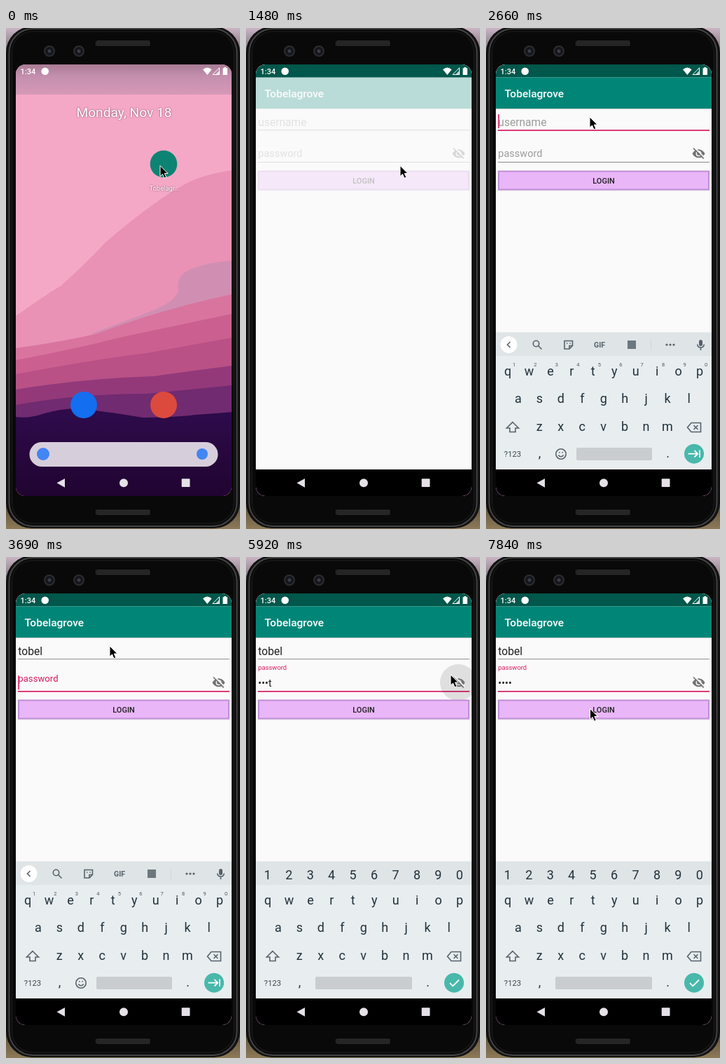
Animation of 334x715 px, one loop 7990 ms. Source, as an HTML page:

```html
<!DOCTYPE html>
<html lang="en">
<head>
<meta charset="utf-8">
<title>Login demo</title>
<style>
html, body { margin: 0; width: 100%; height: 100%; overflow: hidden; background: #000; }
svg { display: block; }
text { font-family: Roboto, sans-serif; white-space: pre; }
.mid { text-anchor: middle; }
.key { font-size: 18px; fill: #20323a; text-anchor: middle; }
.sup { font-size: 7.5px; fill: #4c5a61; text-anchor: middle; }
.med { font-weight: 500; }
.line { fill: none; stroke: #56626a; stroke-width: 1.6; }
.shade { filter: drop-shadow(0 0 1px rgba(60, 20, 50, .7)); }
</style>
</head>
<body>
<svg width="334" height="715" viewBox="0 0 334 715">
  <defs>
    <clipPath id="screen"><rect x="14" y="52" width="308" height="616" rx="14"/></clipPath>
    <clipPath id="body"><rect x="14" y="52" width="308" height="578"/></clipPath>
    <clipPath id="winClip"><rect id="winShape"/></clipPath>
    <linearGradient id="scrimFill" x2="0" y2="1">
      <stop offset="0" stop-color="#a97c95"/><stop offset=".4" stop-color="#c48fae"/><stop offset="1" stop-color="#d699b7"/>
    </linearGradient>
    <linearGradient id="hill" x2="0" y2="1">
      <stop offset="0" stop-color="#2f0b4c"/><stop offset="1" stop-color="#200430"/>
    </linearGradient>
    <linearGradient id="backdrop" x2="0" y2="1">
      <stop offset="0" stop-color="#c9b4c4"/><stop offset=".1" stop-color="#2a2826"/>
      <stop offset=".9" stop-color="#2a2620"/><stop offset="1" stop-color="#8d7a58"/>
    </linearGradient>
    <pattern id="mesh" width="2" height="2" patternUnits="userSpaceOnUse">
      <rect width="2" height="2" fill="#191919"/><rect width="1" height="1" fill="#4a4a4a"/>
    </pattern>
  </defs>

  <!-- phone -->
  <rect width="334" height="715" fill="url(#backdrop)"/>
  <rect x="0" y="-2" width="334" height="716" rx="37" fill="#111"/>
  <rect x="4.5" y="1" width="325" height="710" rx="34" fill="#0b0b0b" stroke="#444" stroke-width="2"/>
  <rect x="8.5" y="5" width="317" height="702" rx="30" fill="#090909" stroke="#1f1f1f"/>
  <rect x="128" y="18" width="78" height="8" rx="3" fill="url(#mesh)"/>
  <rect x="128" y="687" width="78" height="8" rx="3" fill="url(#mesh)"/>
  <g fill="#15161b" stroke="#2d2d30" stroke-width="2">
    <circle cx="62" cy="33" r="7"/><circle cx="104" cy="33" r="7"/>
  </g>
  <g fill="#3a3c48"><circle cx="62" cy="33" r="2.5"/><circle cx="104" cy="33" r="2.5"/></g>

  <g clip-path="url(#screen)">
    <!-- wallpaper -->
    <rect x="14" y="52" width="308" height="616" fill="#f5a8c6"/>
    <path fill="#e992b6" d="M322 203Q275 210 250 226Q210 248 143 305Q110 340 78 368Q50 385 14 411V668H322Z"/>
    <path fill="#d08fb2" d="M322 332Q282 335 258 347Q243 355 246 374Q243 390 205 405L120 437L322 410Z"/>
    <path fill="#d9749f" d="M14 457Q90 446 130 436Q220 402 322 380V668H14Z"/>
    <path fill="#cb6090" d="M14 474Q90 460 170 440L322 408V668H14Z"/>
    <path fill="#b95186" d="M14 494Q120 474 200 464L322 442V668H14Z"/>
    <path fill="#93397a" d="M14 516Q110 500 210 497L322 482V668H14Z"/>
    <path fill="#712b70" d="M14 538Q100 522 200 522L322 510V668H14Z"/>
    <rect id="glow" x="14" y="52" width="308" height="496" fill="#fff"/>
    <path fill="url(#hill)" d="M14 555Q32 558 55 550Q80 543 100 543Q150 548 195 556Q240 556 270 552Q300 550 322 548V668H14Z"/>
    <rect id="scrim" x="14" y="52" width="308" height="43" fill="url(#scrimFill)"/>

    <g id="home">
      <text class="mid shade" x="168.5" y="126.5" font-size="19.2" fill="#fff">Monday, Nov 18</text>
      <circle cx="225" cy="194" r="19.3" fill="#0d8473"/>
      <text class="mid shade" x="225.5" y="231.5" font-size="9.4" fill="#fff">Tobelagr…</text>
      <circle cx="111" cy="538" r="19" fill="#136ef0"/>
      <circle cx="225" cy="538" r="19" fill="#dc4a3d"/>
      <rect x="33.5" y="591" width="269" height="35" rx="17.5" fill="#d7cedb"/>
      <circle cx="53" cy="608" r="9" fill="#4285f4"/>
      <circle cx="280" cy="608" r="8" fill="#4285f4"/>
    </g>

    <!-- app window -->
    <g id="win" clip-path="url(#winClip)">
      <rect x="14" y="52" width="308" height="616" fill="#fafafa"/>
      <rect id="winTop" x="14" width="308" fill="#00574b"/>
      <rect id="winBase" x="14" width="308" height="40" fill="#000"/>
    </g>

    <g id="app">
      <rect x="14" y="115" width="308" height="1.2" fill="#000" opacity=".15"/>
      <rect x="14" y="70.5" width="308" height="44.5" fill="#008577"/>
      <text class="med" x="26.5" y="99" font-size="15.5" fill="#fff">Tobelagrove</text>
      <text id="user" x="17.3" y="139.5" font-size="15.6"></text>
      <rect id="userLine" x="17" width="302"/>
      <rect id="passLine" x="17" width="302"/>
      <text id="hint" x="17.3">password</text>
      <text id="pass" x="17.3" y="184.5" font-size="14.5" fill="#212121"></text>
      <rect id="caret" width="1.6" height="20" fill="#d81b60"/>
      <circle id="ripple" cx="303" cy="179" r="26" fill="#000"/>
      <g transform="translate(303.5 179.3)">
        <path fill="#737373" fill-rule="evenodd" d="M-9 0C-5-8 5-8 9 0C5 8-5 8-9 0ZM-4 0A4 4 0 1 0 4 0A4 4 0 1 0-4 0Z"/>
        <circle r="2.5" fill="#737373"/>
        <g id="slash" fill="none" stroke-width="1.7">
          <path d="M-5.8-8.5L8.6 5.9" stroke="#fafafa"/><path d="M-7.5-7.8L7.2 7" stroke="#737373"/>
        </g>
      </g>
      <rect x="16.5" y="231" width="303" height="1.5" fill="#000" opacity=".1"/>
      <rect x="18" y="204.5" width="300" height="26" fill="#e9b6f8" stroke="#c18ed6" stroke-width="2"/>
      <text class="mid med" x="168" y="221.5" font-size="11" fill="#1f1f1f">LOGIN</text>
    </g>

    <!-- keyboard -->
    <g clip-path="url(#body)">
      <g id="board">
        <rect x="14" y="434.5" width="308" height="196" fill="#e8edf0"/>
        <rect x="14" y="434.5" width="308" height="33.5" fill="#dfe4e7"/>
        <g id="keys"></g>
        <g id="tools">
          <circle cx="32.5" cy="452" r="12" fill="#fff"/>
          <path class="line" d="M34.5 448L30.5 452L34.5 456"/>
          <circle class="line" cx="71.5" cy="450.5" r="4.2"/><path class="line" d="M74.5 453.5L79.5 458.5"/>
          <path class="line" d="M112 446.5H123.5V453.5L119 458H112ZM119 458V453.5H123.5M115 450H116.4M119.4 450H120.8"/>
          <text class="mid" x="162" y="456" font-size="10.5" font-weight="700" fill="#56626a">GIF</text>
          <rect x="202" y="446" width="12" height="12" fill="#6d787e"/>
          <path d="M235.5 445V460" stroke="#cfd5d9"/>
          <g fill="#56626a"><circle cx="258" cy="452" r="1.6"/><circle cx="263" cy="452" r="1.6"/><circle cx="268" cy="452" r="1.6"/>
            <rect x="304" y="445" width="5" height="9" rx="2.5"/></g>
          <path class="line" d="M301.8 451.5Q302 456 306.5 456Q311 456 311.2 451.5M306.5 456V460"/>
          <circle class="line" cx="107" cy="608" r="7.2"/>
          <path class="line" d="M103.3 609.5Q107 614 110.7 609.5M104 605.7H105.6M108.4 605.7H110"/>
        </g>
        <g id="digits"></g>
        <path class="line" d="M38 562.5L46.5 571H42V576.5H34V571H29.5Z"/>
        <path class="line" d="M287.5 570L293 563.5H306.5V576.5H293ZM296.5 567L302.5 573M302.5 567L296.5 573"/>
        <text class="mid" x="38" y="612" font-size="11.3" fill="#37474f">?123</text>
        <text class="key" x="76.5" y="613">,</text>
        <text class="key" x="259.5" y="613">.</text>
        <rect id="space" y="599" height="18" rx="2" fill="#c9cdd0"/>
        <circle cx="297" cy="607.7" r="14" fill="#48b8aa"/>
        <path id="enter" fill="none" stroke="#fff" stroke-width="1.8"/>
      </g>
    </g>

    <!-- system bars -->
    <g fill="#fff">
      <text class="med" x="20.5" y="66" font-size="11">1:34</text>
      <circle cx="55.7" cy="61.7" r="5.3"/>
      <path d="M287.3 67L281 59.2Q287.3 54 293.6 59.2Z"/>
      <path d="M304.5 56.8V66.5H295Z" fill="none" stroke="#fff" stroke-width="1"/>
      <path d="M304.8 60.5V67H298.3Z" opacity=".7"/>
      <path d="M311.2 56H314.2V57.2H316V67H309.5V57.2H311.2Z"/>
    </g>
    <g fill="#e5e1e7">
      <path d="M72.5 649.3L84 643V655.7Z"/><circle cx="168" cy="649.3" r="6"/>
      <rect x="250.7" y="643.3" width="11.8" height="11.8" rx=".8"/>
    </g>
  </g>

  <path id="cursor" d="M0 0V15.2L3.5 12L6 17.8L8.8 16.6L6.3 11H11Z" fill="#000" stroke="#fff" stroke-width="1" stroke-linejoin="round"/>
</svg>
<script>
const LOOP = 7990, TICK = 147.95;
const el = {};
document.querySelectorAll('svg [id]').forEach(n => el[n.id] = n);

const set = (id, attrs) => { for (const k in attrs) el[id].setAttribute(k, attrs[k]); };
const show = (id, on) => set(id, { visibility: on ? 'visible' : 'hidden' });
const clamp = x => Math.min(1, Math.max(0, x));
const mix = (a, b, p) => a + (b - a) * p;
const span = (n, a, b) => clamp((n - a) / (b - a));
const smooth = x => x * x * (3 - 2 * x);

function addKeys(parent, row, x, y, cls = 'key') {
  [...row].forEach((ch, i) => {
    const t = document.createElementNS('http://www.w3.org/2000/svg', 'text');
    t.setAttribute('class', cls);
    t.setAttribute('x', x + i * 30.45);
    t.setAttribute('y', y);
    t.textContent = ch;
    el[parent].append(t);
  });
}
addKeys('keys', 'qwertyuiop', 31, 495.5);
addKeys('keys', 'asdfghjkl', 46, 535);
addKeys('keys', 'zxcvbnm', 76.3, 574.5);
addKeys('tools', '1234567890', 40, 483, 'sup');
addKeys('digits', '1234567890', 30.8, 459.5);

// The window grows from the icon; its top edge lags behind.
function launch(n) {
  const p = smooth(span(n, 3, 6.9));
  const left = mix(206, 14, p ** 1.15), right = mix(244, 322, p);
  const top = mix(174, 52, p ** 3.5), bottom = mix(212, 668, p ** .9);
  set('winShape', { x: left, y: top, width: right - left, height: bottom - top, rx: 13 });
  set('winTop', { y: top, height: mix(10, 18.5, p) });
  set('winBase', { y: bottom - 38 * p ** 12 });
  show('win', n > 3);
  set('home', { opacity: 1 - .8 * p, transform: `translate(0 ${-38 * p})` });
  set('scrim', { opacity: clamp(1 - 1.2 * p) });
  set('glow', { opacity: .1 * p });
}

function form(n) {
  set('app', { opacity: n < 10 ? 0 : n < 11 ? .25 : 1 });
  const onUser = n >= 16 && n < 25, onPass = n >= 25;

  const typed = 'tobel'.slice(0, Math.max(0, n - 19));
  el.user.textContent = typed || 'username';
  set('user', { fill: typed ? '#212121' : '#9c9c9c' });

  const rule = on => on ? { height: 1.7, fill: '#d81b60' } : { height: 1, fill: '#8c8c8c' };
  set('userLine', { y: 145.2, ...rule(onUser) });
  set('passLine', { y: 191, ...rule(onPass) });

  const f = smooth(span(n, 24, 27));
  set('hint', { y: mix(184, 161, f), 'font-size': mix(14.5, 9.4, f), fill: onPass ? '#d81b60' : '#9c9c9c' });

  const count = n < 30 ? 0 : n < 32 ? 1 : Math.min(4, n - 30);
  const plain = n >= 42 && n < 48;
  const secret = 'test'.slice(0, count);
  el.pass.textContent = plain ? secret
    : n < 42 ? '•'.repeat(Math.max(0, count - 1)) + secret.slice(-1)
    : '•'.repeat(count);
  show('slash', !plain);

  const blink = n === 29 || (n >= 37 && n < 42) || n >= 51;
  const field = onPass ? 'pass' : 'user';
  const shown = onPass ? count : typed.length;
  set('caret', {
    x: 17.3 + (shown ? el[field].getComputedTextLength() : 0),
    y: onPass ? 169.3 : 123
  });
  show('caret', (onUser || onPass) && !blink);

  const press = n < 47 ? 39 : 47, release = n < 47 ? 42 : 48;
  const fade = 1 - span(n, release - 1, release + (n < 47 ? 4 : 2));
  set('ripple', { r: n === press ? 14 : 26, opacity: n < 39 ? 0 : .11 * fade });
}

function keyboard(n) {
  show('board', n >= 17);
  set('board', { transform: `translate(0 ${n === 17 ? 80 : 0})` });
  const secure = n >= 26;
  set('tools', { display: secure ? 'none' : 'inline' });
  set('digits', { display: secure ? 'inline' : 'none' });
  const x = secure ? 99 : 129;
  set('space', { x, width: 237 - x });
  set('enter', { d: n >= 35 ? 'M291 608L295.3 612.3L304 603.5' : 'M288.5 607.7H302M297.5 603L302.2 607.7L297.5 612.4M305 602.5V613' });
}

function pointer(n) {
  const a = smooth(span(n, 12, 16)), b = smooth(span(n, 34, 39)), c = smooth(span(n, 48, 52));
  const x = mix(mix(mix(220, 148, a), 292, b), 148.5, c);
  const y = mix(mix(mix(196.5, 127, a), 168, b), 216.5, Math.sqrt(c));
  set('cursor', { transform: `translate(${x} ${y})` });
}

let last = -1;
function draw() {
  const t = performance.now() % LOOP;
  const n = Math.min(53, Math.floor((t + 16) / TICK));
  if (n !== last) {
    last = n;
    launch(n);
    form(n);
    keyboard(n);
    pointer(n);
  }
  requestAnimationFrame(draw);
}
draw();
</script>
</body>
</html>
```
